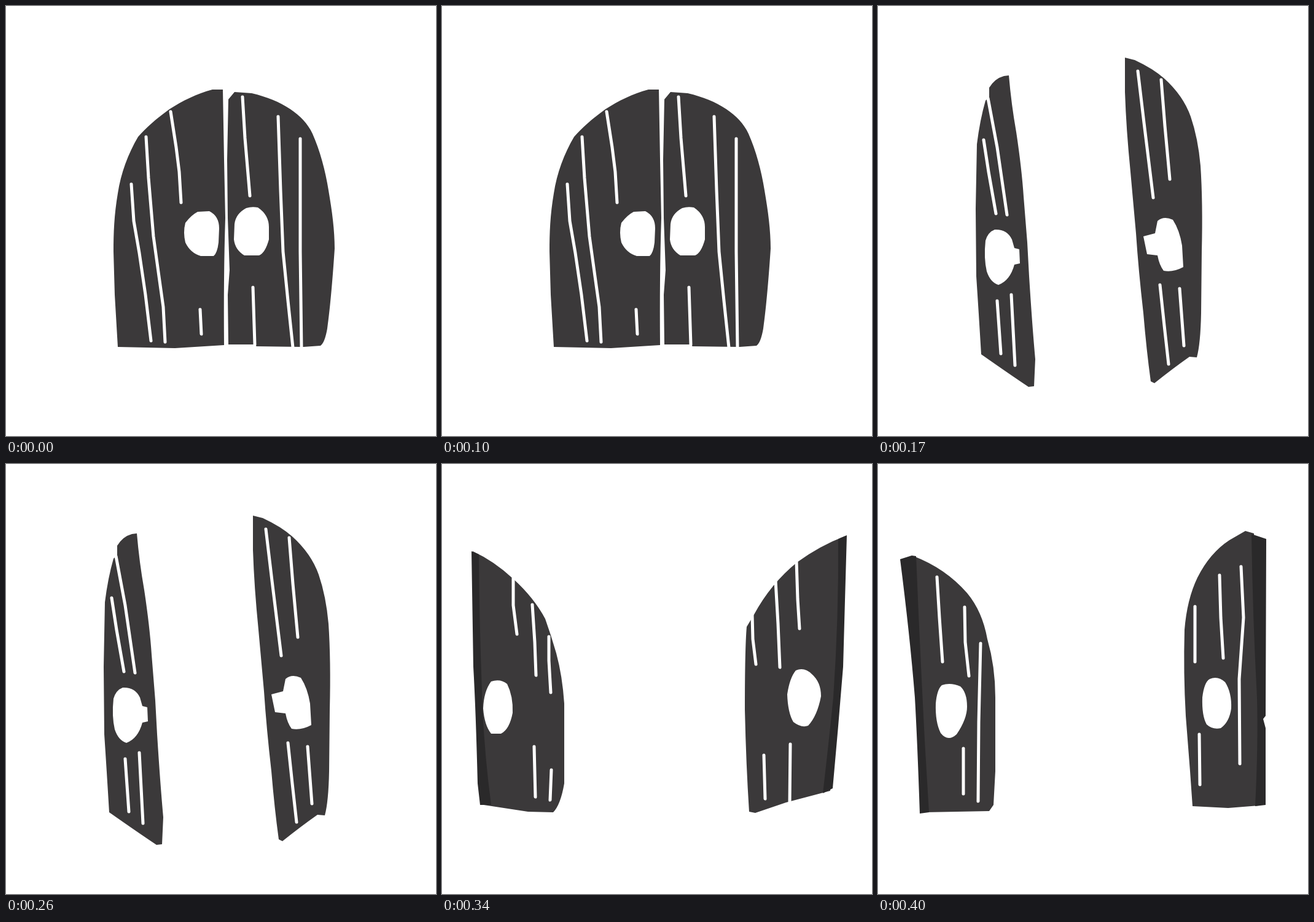
Write an HTML page with a canvas that moves like this. It is 700 px wide and 700 px high and loops after 0.44 s.

```html
<!DOCTYPE html>
<html lang="en">
<head>
<meta charset="utf-8">
<title>Wooden doors</title>
<style>
  html, body { margin: 0; width: 100%; height: 100%; overflow: hidden; background: #fff; }
  canvas { display: block; width: 100vmin; height: 100vmin; }
</style>
</head>
<body>
<canvas id="stage" width="700" height="700"></canvas>
<script>
const ctx = document.getElementById('stage').getContext('2d');
const LOOP = 440;
const WOOD = '#3b393a', SIDE = '#2a292a', WHITE = '#fff';

// Each pose: when it starts, door faces, door edges, knob holes, cracks.
const closed = {
  start: 0,
  face: `M353 136 L336 136 C310 143 288 154 266 168 C244 184 228 198 215 213
    C199 240 187 272 182 305 C176 340 175 370 175 400 L177 470 L182 555 L275 557
    L355 552 Q354 440 357 345 L355 250Z
    M362 152 L372 140 L400 142 C425 148 445 156 463 168 C479 179 491 191 499 208
    C511 235 520 268 525 300 C531 335 535 365 535 395 C532 440 528 490 523 525
    Q519 548 512 553 L484 555 L408 554 L404 551 L362 551 L361 470 L364 430 L361 345 L360 250Z`,
  side: '',
  hole: `M312 335 L331 334 Q347 342 347 362 L346 385 Q344 402 338 407 L317 407
    Q300 402 292 385 Q288 368 292 353 Q302 340 312 335Z
    M391 329 Q400 326 410 328 Q428 340 428 360 L428 380 Q422 402 412 406 L388 406
    Q373 397 371 380 L372 355 Q374 338 391 329Z`,
  crack: `M204 290 L208 350 L217 402 L227 470 L236 545
    M228 213 L232 280 L240 375 L249 440 L256 490 L259 547
    M268 172 L277 230 L282 270 L285 320 M316 494 L318 534 M385 148 L389 215 L397 309
    M443 180 L447 300 L451 400 L459 480 L467 556 M479 216 L479 400 L481 556 M402 458 L405 551`
};

const swinging = {
  start: 170,
  face: `M181 133 Q190 118 205 114 L213 113 Q217 160 225 205 Q234 265 237 310 L243 385
    L246 440 Q251 520 256 575 L254 619 L245 620 Q215 600 168 567 Q164 500 160 440
    L159 330 L161 225 Q166 185 175 154 L181 148Z
    M402 84 L418 88 Q448 102 466 118 Q497 146 509 180 Q521 215 525 260 Q529 320 527 400
    L526 500 Q525 550 519 572 L507 571 Q480 590 450 614 L444 611 Q437 560 432 500
    Q424 430 420 370 L411 270 Q404 200 402 140Z`,
  side: '',
  hole: `M190 364 Q210 363 218 380 L222 394 L230 396 L231 419 L222 421 Q215 447 196 454
    Q183 450 177 432 Q172 410 175 382 Q179 368 190 364Z
    M455 350 Q465 341 480 348 Q491 365 495 390 L497 425 Q480 434 465 431
    Q458 422 455 406 L438 404 L432 375 L451 370Z`,
  crack: `M179 150 L194 230 L210 340 M172 218 L180 270 L192 338 M194 480 L200 566
    M217 470 L223 585 M423 106 L433 190 L448 312 M461 120 L467 195 L475 282
    M459 454 L466 520 L473 583 M491 460 L498 553`
};

const past = {
  start: 320,
  face: `M123 146 Q142 162 152 186 Q178 225 189 272 L191 310 Q199 350 199 400 L199 490
    L195 515 L194 560 L189 570 L178 571 L128 584Z
    M554 96 Q525 125 508 160 Q494 195 491 245 L491 440 L496 555 L515 562 L560 588
    L578 520 L580 240 L562 94Z`,
  side: `M98 121 L123 123 L124 145 Q129 260 132 370 L130 590 L126 596 L110 598
    L112 500 L114 430 L108 330 Q102 230 100 180Z
    M553 96 L578 80 L593 79 L597 160 L596 400 L590 560 L583 597 L560 597 L559 585
    Q570 560 572 520 L575 350 L572 240 Q568 150 553 96Z`,
  hole: `M160 402 Q172 392 186 400 Q194 415 194 440 Q194 462 187 474 Q176 484 164 474
    Q157 460 156 444 L145 442 L144 415 L153 414 Q155 406 160 402Z
    M518 374 Q530 367 542 377 L547 391 L560 394 L559 429 L548 431 Q546 450 538 461
    Q520 457 512 435 Q505 410 510 388Z`,
  crack: `M151 190 L152 280 L155 350 M169 222 L169 300 L173 368 M155 480 L154 576
    M176 518 L178 572 M544 120 L549 210 L555 350 M521 188 L525 240 L530 289
    M516 512 L515 563 M541 510 L536 575`,
  width: 3.6
};

const wide = {
  start: 340,
  face: `M50 142 Q85 158 116 187 Q150 218 168 252 Q178 280 186 308 Q196 345 199 390
    L199 520 Q193 555 181 567 L140 566 L68 555Z
    M657 117 Q615 133 578 160 Q535 195 508 245 L496 265 Q493 300 493 400
    Q495 490 500 566 L510 568 L560 551 L632 532Z`,
  side: `M48 142 L60 147 Q61 260 64 340 L66 400 Q70 480 80 555 L62 555 L58 520
    Q55 400 51 330Z
    M645 122 L659 116 Q656 220 653 330 Q645 430 636 528 L620 536
    Q630 450 637 380 Q646 250 645 122Z`,
  hole: `M80 354 Q95 349 106 358 Q116 378 115 405 Q110 432 96 439 L80 439
    Q69 425 67 398 Q68 370 80 354Z
    M576 336 Q590 330 602 342 Q617 355 617 378 Q611 410 596 426 Q585 430 572 420
    Q563 405 562 375 Q566 348 576 336Z`,
  crack: `M116 186 L116 230 L122 277 M147 229 L151 290 L153 344 M174 281 L174 320 L177 372
    M150 460 L152 542 M178 498 L176 547 M577 158 L579 220 L582 268
    M543 190 L547 260 L550 331 M505 246 L506 285 L511 326 M524 474 L526 545
    M567 456 L566 552`
};

const rebound = {
  start: 400,
  face: `M58 150 Q110 170 145 210 Q170 240 178 285 Q191 330 191 380 L191 500 L188 555
    L181 565 L76 567Z
    M612 113 L598 109 L572 124 Q540 145 520 185 Q503 220 499 270 Q497 340 501 410
    L508 500 L512 557 L570 560 L620 556 L622 380Z`,
  side: `M36 155 L55 149 L62 150 Q66 250 71 350 L76 450 L83 567 L68 569
    Q64 450 60 380 Q52 280 36 155Z
    M608 114 L632 122 L631 410 L627 415 L631 430 L631 555 L614 557
    Q619 460 617 380 Q610 250 608 114Z`,
  hole: `M104 360 Q118 355 134 362 Q145 372 145 395 Q145 415 128 440 Q114 453 102 438
    Q93 420 94 390 Q96 367 104 360Z
    M540 350 Q553 344 565 355 Q576 372 575 398 Q572 420 558 430 Q545 433 535 424
    Q527 410 528 380 Q531 355 540 350Z`,
  crack: `M96 184 L100 250 L105 322 M141 233 L142 290 L148 345 M167 292 L164 420 L163 549
    M139 463 L139 537 M516 232 L516 322 M556 181 L558 250 L562 316
    M591 167 L595 250 L588 350 L589 488 M523 440 L524 522`
};

const poses = [closed, swinging, past, wide, rebound];
for (const p of poses)
  for (const part of ['face', 'side', 'hole', 'crack']) p[part] = new Path2D(p[part]);

function fill(path, color) {
  ctx.fillStyle = color;
  ctx.fill(path);
}

function draw(pose) {
  ctx.fillStyle = WHITE;
  ctx.fillRect(0, 0, 700, 700);
  fill(pose.face, WOOD);
  fill(pose.side, SIDE);
  fill(pose.hole, WHITE);
  ctx.strokeStyle = WHITE;
  ctx.lineWidth = pose.width || 5;
  ctx.lineCap = ctx.lineJoin = 'round';
  ctx.stroke(pose.crack);
}

function tick() {
  const t = performance.now() % LOOP;
  draw(poses.findLast(p => t >= p.start));
  requestAnimationFrame(tick);
}
tick();
</script>
</body>
</html>
```
